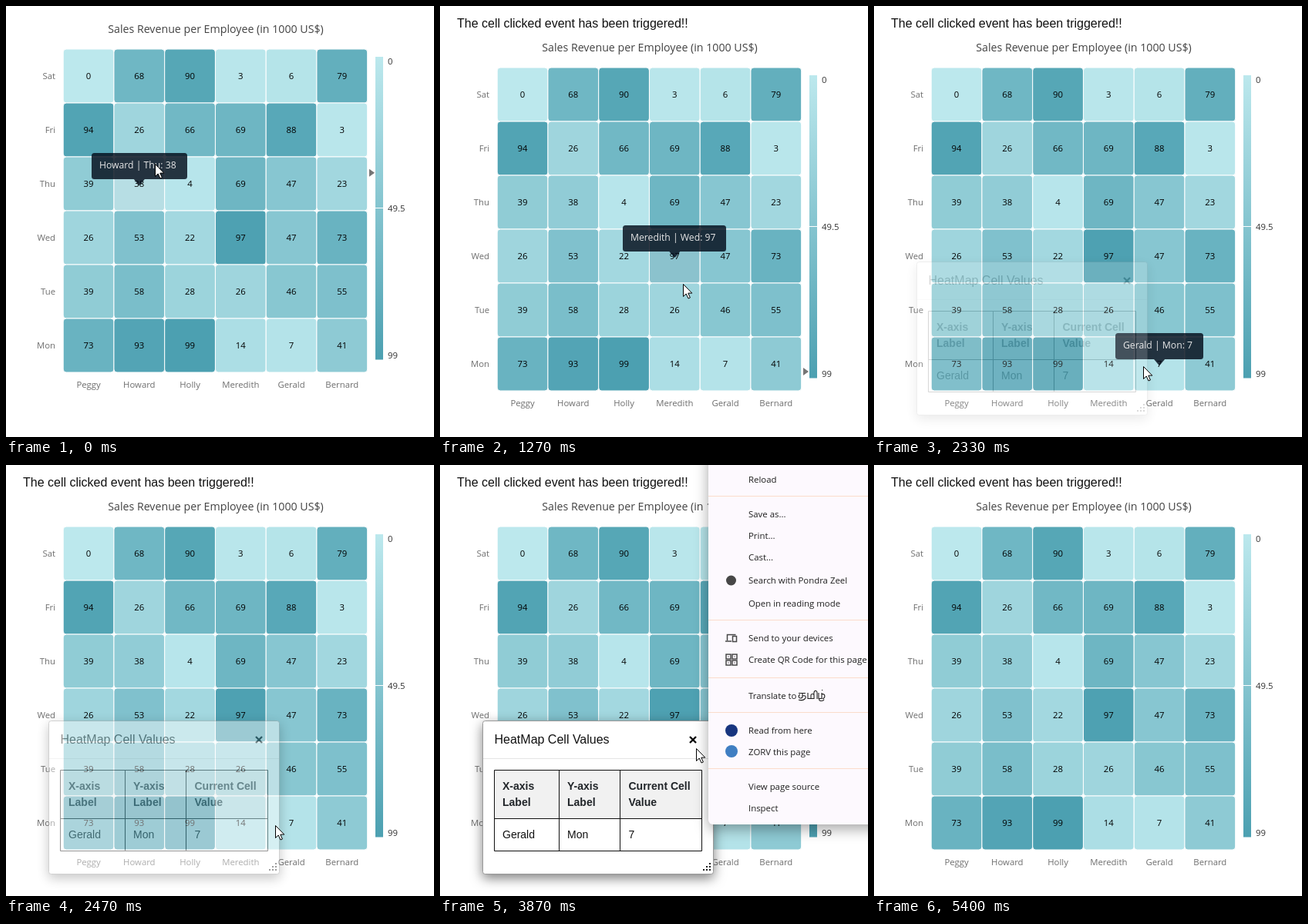
Write an HTML page that moves like this. It is 555 px wide and 560 px high and loops after 5.67 s.

```html
<!DOCTYPE html>
<html lang="en">
<head>
<meta charset="utf-8">
<title>Heat map cell events</title>
<style>
html, body { margin: 0; width: 100%; height: 100%; overflow: hidden; background: #fff; }
svg { display: block; width: 555px; height: 560px; }
text { font: 11.35px "Open Sans", "Noto Sans", sans-serif; white-space: pre; }
.title { font-size: 14.2px; fill: #424242; }
.axis { fill: #6e6e6e; }
.scale { fill: #333; }
.mid { text-anchor: middle; }
.end { text-anchor: end; }
.tip text { font-size: 12.2px; fill: #e6e6e6; }
.tip rect, .tip path { fill: #000816; }
.msg, .dialog text { font: 16px "Liberation Sans", Arial, sans-serif; fill: #111; }
.dialog .cell { font-size: 14px; }
.dialog .head { font-size: 14px; font-weight: bold; fill: #212529; }
.panel { fill: #fff; stroke: #999; filter: drop-shadow(0 5px 7.5px rgba(0,0,0,.5)); }
.line { fill: none; stroke: #111; }
.menu text { font-size: 11.4px; fill: #1f1f1f; }
.sheet { fill: #fdf9fe; filter: drop-shadow(0 6px 9px rgba(0,0,0,.35)); }
.sep { stroke: #fbdccb; }
.icon { fill: none; stroke: #474747; stroke-width: 1.5; }
</style>
</head>
<body>
<svg id="stage" viewBox="0 0 555 560"></svg>
<script>
const LOOP = 5670, STEP = 1000 / 15, LAST = 84;
const LEFT = 74.2, TOP = 56, CW = 65.75, CH = 70, SHIFT = 24;
// Steps at which things happen
const CLICK = 13, OPEN = 35, MENU = 42, DISMISS = 68, CLOSE = 70;

const names = ['Peggy', 'Howard', 'Holly', 'Meredith', 'Gerald', 'Bernard'];
const days = ['Sat', 'Fri', 'Thu', 'Wed', 'Tue', 'Mon'];
const data = [
  [0, 68, 90, 3, 6, 79],
  [94, 26, 66, 69, 88, 3],
  [39, 38, 4, 69, 47, 23],
  [26, 53, 22, 97, 47, 73],
  [39, 58, 28, 26, 46, 55],
  [73, 93, 99, 14, 7, 41]
];
const light = [188, 232, 237], dark = [76, 160, 177];

// Cursor moves: first step, last step, end point
const home = [193, 205];
const moves = [
  [0, 7, 236, 224], [16, 19, 315, 361], [19, 25, 349, 468],
  [49, 54, 236, 425], [54, 58, 332, 368], [58, 60, 343, 366],
  [60, 62, 331, 360], [63, 65, 325, 358], [74, 78, 110, 490], [78, 81, 80, 590]
];

const cx = c => LEFT + CW * (c + .5);
const cy = r => TOP + CH * (r + .5);
const shade = v => `rgb(${light.map((a, i) => Math.round(a + (dark[i] - a) * v / 99))})`;
const label = (x, y, s, cls = '') => `<text x="${x}" y="${y}" class="${cls}">${s}</text>`;

function chart() {
  let out = label(272, 35, 'Sales Revenue per Employee (in 1000 US$)', 'title mid');
  data.forEach((row, r) => row.forEach((v, c) => {
    out += `<rect id="c${c}${r}" x="${LEFT + c * CW}" y="${TOP + r * CH}" width="${CW}" height="${CH}"
      rx="4" fill="${shade(v)}" stroke="#fff"/>` + label(cx(c), cy(r) + 4, v, 'mid');
  }));
  days.forEach((d, r) => out += label(64, cy(r) + 4, d, 'axis end'));
  names.forEach((n, c) => out += label(cx(c), 496, n, 'axis mid'));
  out += `<rect x="479" y="66" width="10" height="393.5" fill="url(#ramp)"/>
    <path d="M479 262.5h10" stroke="#fff"/>`;
  ['0', '49.5', '99'].forEach((s, i) => out += label(495, 76 + 191 * i, s, 'scale'));
  return out + `<path id="marker" d="M471 -5L478 0L471 5Z" fill="#757575"/>
    <g id="tip" class="tip"><g opacity=".8"><rect id="tipBox" height="34" rx="3.5"/>
    <path id="tipArrow" d="M-7 0H7L1.2 7Q0 8.4 -1.2 7Z"/></g><text id="tipText"></text></g>`;
}

function dialog() {
  let dots = '';
  for (let i = 0; i < 3; i++)
    for (let j = 0; j <= i; j++) dots += `M${349 - 4 * j} ${517 + 4 * i}h2v2h-2z`;
  const columns = [
    [81, 'X-axis', 'Label', names[4]],
    [165, 'Y-axis', 'Label', 'Mon'],
    [244.5, 'Current Cell', 'Value', '7']
  ];
  return `<rect class="panel" x="55.5" y="332.5" width="299" height="199" rx="3"/>
    <path d="M56 381.5h298" stroke="#e5e5e5"/>
    <path d="M324 353l8 8m0-8l-8 8" stroke="#000" stroke-width="2.3"/>
    <rect x="70" y="396" width="270" height="63" fill="#f1f1f1"/>
    <path class="line" d="M70.5 396.5h269v105h-269zM70 459.5h270M154.5 396v105M233.5 396v105"/>
    <path d="${dots}" fill="#222"/>` +
    label(70.5, 362, 'HeatMap Cell Values') +
    columns.map(([x, a, b, v]) =>
      label(x, 422, a, 'head') + label(x, 443, b, 'head') + label(x, 485, v, 'cell')).join('');
}

function menu() {
  // First row and row height of each group
  const groups = [
    [19, 28, 'Reload'],
    [64, 28, 'Save as...', 'Print...', 'Cast...'],
    [150, 30, 'Search with Pondra Zeel', 'Open in reading mode'],
    [225, 28, 'Send to your devices', 'Create QR Code for this page'],
    [300, 28, 'Translate to'],
    [345, 28, 'Read from here', 'ZORV this page'],
    [418, 28, 'View page source', 'Inspect']
  ];
  let rows = '', seps = '', tiles = '', last = 0;
  for (const [y, h, ...items] of groups) {
    if (last && y - last > 30) seps += `M348 ${y - 23.5}h207`;
    items.forEach((s, i) => rows += label(400, (last = y + h * i) + 4, s));
  }
  for (const x of [371, 379]) for (const y of [246, 254])
    tiles += `M${x} ${y}h6v6h-6zM${x + 2.5} ${y + 3}h1`;
  return `<rect class="sheet" x="348" y="-20" width="240" height="487" rx="6"/>
    <path class="sep" d="${seps}"/>${rows}
    <circle cx="377.5" cy="150" r="6.5" fill="#474747"/>
    <path class="icon" d="M372.5 228v-7.5h11M370 229h8M379.5 222.5h5v7h-5z"/>
    <path class="icon" d="${tiles}"/>
    <circle cx="378" cy="345" r="8" fill="#17357f"/>
    <circle cx="378" cy="372" r="8" fill="#3f7ec2"/>
    <path aria-label="தமிழ்" fill="none" stroke="#1f1f1f" stroke-width="1.1" d="
      M465 296.5h9M470 296.5v4a2.4 2.4 0 1 1-3-2.2M470 300c5-1 5 2 3 4s-6 2-8 1
      M477 296v7.5h8v-4a2 2 0 0 0-4 0v4M485 299c-1-7 4-7 4-3v8
      M491 296v7.5h4v-7.5M495 298c5-2 5 5.5 1 5.5M492 303.5c-2 3.5 5 4 6 1M495 292.5h1.2"/>`;
}

const stage = document.getElementById('stage');
stage.innerHTML = `<defs><linearGradient id="ramp" x2="0" y2="1">
    <stop stop-color="${shade(0)}"/><stop offset="1" stop-color="${shade(99)}"/></linearGradient></defs>
  <g id="msg">${label(22, 28, 'The cell clicked event has been triggered!!', 'msg')}</g>
  <g id="chart">${chart()}</g>
  <g id="dialog" class="dialog">${dialog()}</g>
  <g id="menu" class="menu">${menu()}</g>
  <path id="cursor" d="M.5 .5V16.5L4.2 13L7 19L9.4 18L6.8 12.1H11.8Z" fill="#fff" stroke="#000"/>`;

const $ = id => document.getElementById(id);
const show = (id, on) => $(id).style.display = on ? '' : 'none';
const place = (id, x, y) => $(id).setAttribute('transform', `translate(${x} ${y})`);
const shiftAt = k => k >= CLICK ? SHIFT : 0;

function cursorAt(k) {
  let [x, y] = home;
  for (const [from, to, tx, ty] of moves) {
    const f = Math.min(1, Math.max(0, (k - from) / (to - from)));
    const e = f * f * (3 - 2 * f);
    x += (tx - x) * e;
    y += (ty - y) * e;
  }
  return [Math.round(x), Math.round(y)];
}

// Cell under the pointer, unless the dialog is open
function hoverAt(k) {
  if (k >= OPEN && k < CLOSE) return null;
  const [x, y] = cursorAt(k);
  const c = Math.floor((x - LEFT) / CW);
  const r = Math.floor((y - TOP - shiftAt(k) - 2) / CH);
  return data[r]?.[c] === undefined ? null : [c, r];
}

function placeTip(c, r, alpha) {
  $('tip').setAttribute('opacity', alpha);
  $('tipText').textContent = `${names[c]} | ${days[r]}: ${data[r][c]}`;
  const w = Math.round($('tipText').getComputedTextLength() + 24);
  const x = Math.max(74, Math.round(cx(c) - w / 2)), y = cy(r) - 40;
  $('tipBox').setAttribute('width', w);
  place('tipBox', x, y);
  place('tipArrow', cx(c), y + 34);
  place('tipText', x + 10, y + 20);
}

let lit = null;
function draw(k) {
  show('msg', k >= CLICK);
  place('chart', 0, shiftAt(k));

  // The tooltip lingers for two steps after the pointer leaves
  const cell = hoverAt(k);
  const tip = cell || hoverAt(k - 1) || hoverAt(k - 2);
  show('marker', cell);
  show('tip', tip);
  if (tip) placeTip(...tip, cell || hoverAt(k - 1) ? 1 : .5);
  if (lit) lit.style.fillOpacity = 1;
  lit = cell && $('c' + cell.join(''));
  if (lit) {
    lit.style.fillOpacity = .65;
    place('marker', 0, 66 + data[cell[1]][cell[0]] / 99 * 393);
  }

  show('dialog', k >= OPEN && k < CLOSE);
  $('dialog').setAttribute('opacity', Math.min(1, .16 + .84 * (k - OPEN) / 6));
  show('menu', k >= MENU && k < DISMISS);
  place('cursor', ...cursorAt(k));
}

const start = performance.now();
let shown = -1;
function tick() {
  const t = (performance.now() - start) % LOOP;
  const k = Math.min(LAST, Math.floor((t + 5) / STEP));
  if (k !== shown) draw(shown = k);
  requestAnimationFrame(tick);
}
tick();
</script>
</body>
</html>
```
